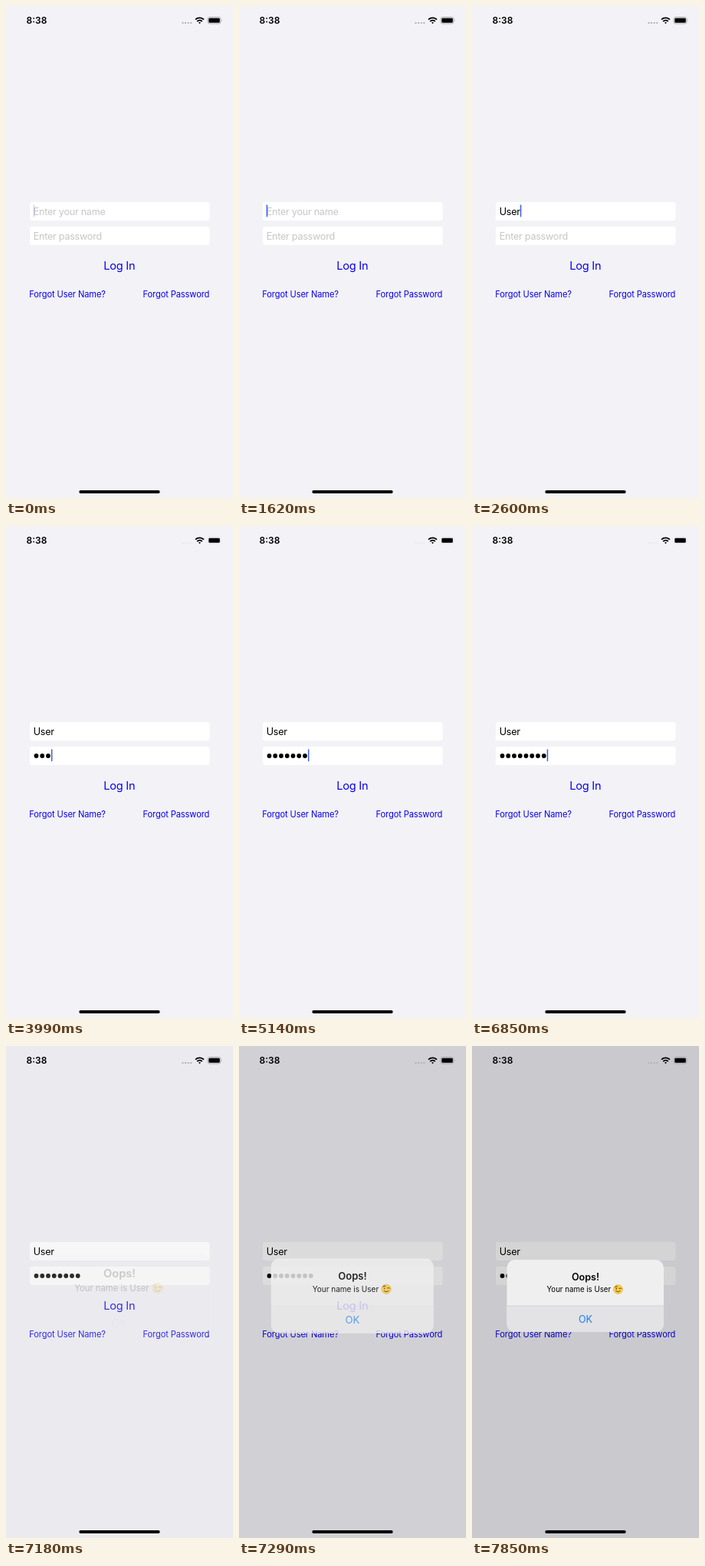
Write an HTML page that moves like this. It is 296 by 640 pixels and loops after 8000 ms.

```html
<!DOCTYPE html>
<html lang="en">
<head>
<meta charset="utf-8">
<title>Log in</title>
<style>
  html, body { margin: 0; width: 100%; height: 100%; overflow: hidden; background: #f3f2f7; }
  svg { display: block; width: 296px; height: 640px; font-family: Inter, "Liberation Sans", sans-serif; }
  .field { font-size: 12.6px; letter-spacing: -.25px; }
  .hint { fill: #c6c6c8; }
  .link { font-size: 11.1px; letter-spacing: -.1px; fill: #0800ec; }
  .login { font-size: 14.6px; letter-spacing: -.25px; fill: #0800ec; }
  .mid { text-anchor: middle; }
</style>
</head>
<body>
<svg viewBox="0 0 296 640">
  <rect width="296" height="640" fill="#f3f2f7"/>
  <g fill="#fff">
    <rect x="31" y="255" width="234.500" height="24" rx="3"/>
    <rect x="31" y="287" width="234.500" height="24" rx="3"/>
  </g>
  <text id="nameHint" class="field hint" x="35.700" y="272">Enter your name</text>
  <text id="passHint" class="field hint" x="35.700" y="304">Enter password</text>
  <text id="name" class="field" x="35.700" y="272"></text>
  <g id="dots"></g>
  <rect id="caret" width="1.500" height="16" rx=".7" fill="#3c5fe6"/>
  <text class="login mid" x="147.800" y="342.800">Log In</text>
  <text class="link" x="30.300" y="379">Forgot User Name?</text>
  <text class="link" x="265.300" y="379" text-anchor="end">Forgot Password</text>

  <rect id="dim" width="296" height="640"/>

  <text x="26.500" y="23" font-size="12" font-weight="600">8:38</text>
  <g id="faint" fill="#b4b4b8">
    <path d="M229.500 21h2v2h-2zM233 21h2v2h-2zM236.700 21h2v2h-2zM240.300 21h2v2h-2z"/>
    <rect x="263" y="14.500" width="17" height="8.500" rx="2.500" fill="none" stroke="#a5a5a8" stroke-width=".9"/>
    <path d="M281 17.200q1.500 1.500 0 3z"/>
  </g>
  <rect x="264.300" y="15.700" width="14.500" height="6.100" rx="1.400"/>
  <g fill="none" stroke="#000" stroke-width="1.800">
    <path d="M247 17.600a8 8 0 0 1 11 0M249.200 20a4.900 4.900 0 0 1 6.600 0"/>
    <path d="M252.500 23.200l-1.500-1.600a2.200 2.200 0 0 1 3 0z" fill="#000" stroke="none"/>
  </g>
  <rect x="95.300" y="629.900" width="105.400" height="4.200" rx="2.100"/>

  <g id="alert">
    <clipPath id="card"><rect x="45.500" y="278" width="204.500" height="94" rx="10.500"/></clipPath>
    <g clip-path="url(#card)">
      <path fill="#efeff0" d="M45 278h206v95H45z"/>
      <g id="foot">
        <path fill="#e3e2e5" d="M45 338h206v35H45z"/>
        <path stroke="#c8c7cb" stroke-width=".7" d="M45 338h206"/>
      </g>
    </g>
    <text class="mid" x="148" y="304.700" font-size="12.600" font-weight="600">Oops!</text>
    <text x="97.500" y="320" font-size="9.700">Your name is User</text>
    <text id="ok" class="mid" x="148" y="360" font-size="12.600" fill="#1580f2">OK</text>
    <g transform="translate(190.500 316.500)" fill="none" stroke="#6b4318" stroke-linecap="round">
      <circle r="6" fill="#f8cf4c" stroke="#e5ac34" stroke-width=".6"/>
      <path d="M-4-3q1.500-1.500 3-.6M1.200-1.200q1.500-1 3 .2M-2.800 2.200q3 2.500 5.600 0"/>
      <ellipse cx="-2.300" cy="-.8" rx=".8" ry="1.100" fill="#6b4318" stroke="none"/>
    </g>
  </g>
</svg>
<script>
const LOOP = 8000;
const NAME = 'User', NAME_START = 2300, LETTER = 100;
const PASS_FOCUS = 2940, PITCH = 7.75;
const KEYS = [3440, 3660, 3990, 4130, 4310, 4520, 5140, 5380];
const POPUP = 7070, STEP = 110;

const el = id => document.getElementById(id);
const clamp = (v, max) => Math.max(0, Math.min(max, v));
const set = (id, attrs) => {
  for (const key in attrs) el(id).setAttribute(key, attrs[key]);
};

el('dots').innerHTML = KEYS.map((_, i) =>
  `<circle cx="${39.5 + PITCH * i}" cy="299" r="2.9"/>`).join('');

// The caret's blink starts over whenever the user types or changes field.
function caretAlpha(t) {
  if (t >= POPUP) return 0;
  const period = 985;
  const start = [120, NAME_START, PASS_FOCUS, ...KEYS].filter(k => k <= t).pop() ?? 120 - period;
  const phase = (t - start) % period;
  return phase < 605 ? 1 : phase < 870 ? .28 : .6;
}

// The alert arrives in visible steps along a smooth ease.
function popupProgress(t) {
  const held = Math.floor((t - POPUP) / STEP) * STEP;
  const u = clamp((held - 45) / 240, 1);
  return u * u * (3 - 2 * u);
}

function draw(t) {
  const name = NAME.slice(0, clamp(Math.floor((t - NAME_START) / LETTER) + 1, NAME.length));
  const count = KEYS.filter(k => k <= t).length;
  const inPass = t >= PASS_FOCUS;

  el('name').textContent = name;
  set('nameHint', { opacity: name ? 0 : 1 });
  set('passHint', { opacity: count ? 0 : 1 });
  [...el('dots').children].forEach((dot, i) => dot.setAttribute('opacity', i < count ? 1 : 0));

  const offset = inPass ? PITCH * count : name ? el('name').getComputedTextLength() : 0;
  set('caret', { x: 35.7 + offset, y: inPass ? 290.3 : 258.5, opacity: caretAlpha(t) });
  set('faint', { opacity: t >= KEYS[1] && t < POPUP ? .15 : 1 });

  const p = popupProgress(t);
  set('dim', { opacity: .17 * p });
  set('alert', {
    opacity: p,
    transform: `translate(148 325) scale(${1.2 - .2 * p}) translate(-148 -325)`
  });
  set('ok', { opacity: p });
  set('foot', { opacity: p ** 6 });
}

function frame(now) {
  draw(now % LOOP);
  requestAnimationFrame(frame);
}
draw(0);
requestAnimationFrame(frame);
</script>
</body>
</html>
```
